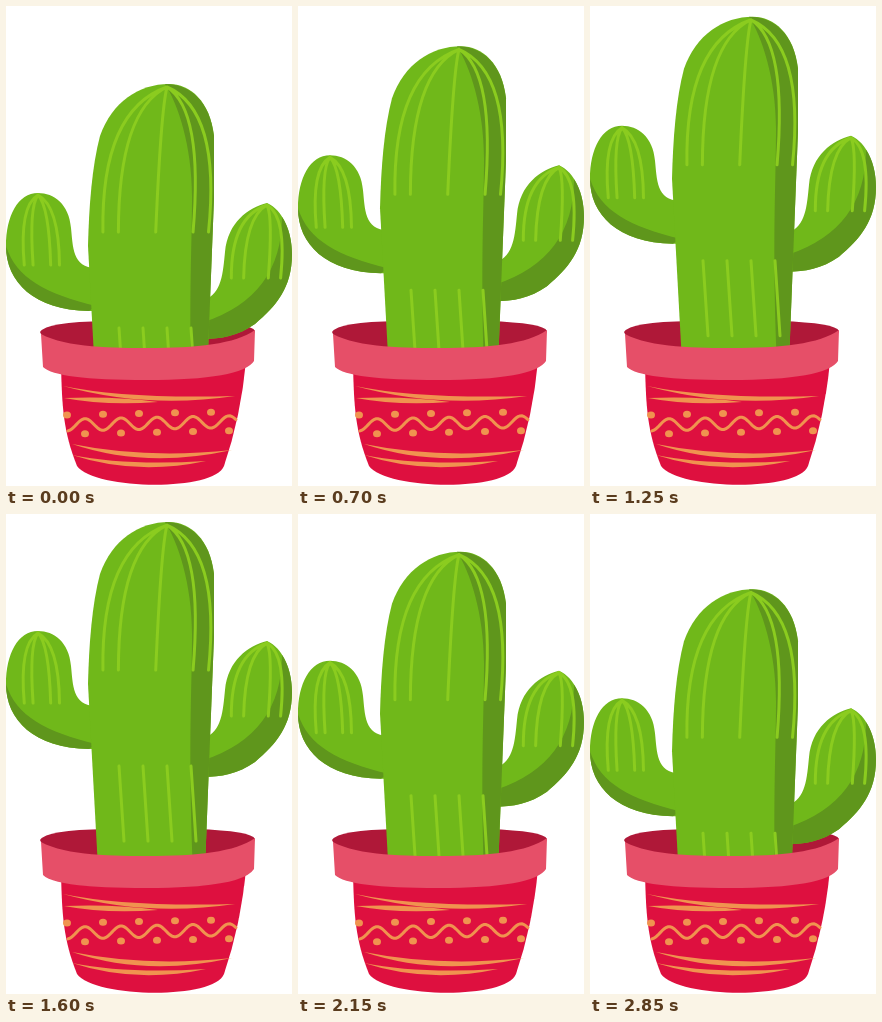
An HTML page for the animation above (2900 ms loop, 286 px wide and 480 px high).

```html
<!DOCTYPE html>
<html lang="en">
<head>
<meta charset="utf-8">
<title>Growing cactus</title>
<style>
  html, body { margin: 0; height: 100%; overflow: hidden; background: #fff; }
  svg { display: block; width: 100vw; height: 100vh; }
  .green { fill: #70b81a; }
  .shade { fill: #5f961c; }
  .line { fill: none; stroke-width: 3; stroke-linecap: round; }
  #ribs { stroke: #8bcc1f; }
  #wave { stroke: #f0934f; }
  .paint { fill: #f0934f; }
</style>
</head>
<body>
<svg viewBox="0 0 286 480">
  <!-- inside of the pot -->
  <path fill="#af1838" d="M34 326Q40 316 100 315H190Q246 317 249 325L240 348H45Z"/>

  <g id="plant">
    <!-- left arm -->
    <path class="green" d="M90 262C66 262 67 240 65 222C63 198 48 187 32 187C12 187 0 210 0 240C0 276 28 304 83 305H90Z"/>
    <path class="shade" d="M0 240C0 276 28 304 83 305L90 300C40 288 10 272 0 240Z"/>
    <!-- right arm -->
    <path class="green" d="M198 294C216 288 217 266 219 246C222 216 242 202 261 197C277 204 286 226 286 248C286 282 270 300 249 318C232 330 214 333 198 333Z"/>
    <path class="shade" d="M276 211C283 221 286 235 286 248C286 282 270 300 249 318C232 330 214 333 198 333V316Q276 290 276 211Z"/>
    <!-- trunk -->
    <path class="green" d="M163 78C133 78 106 96 94 130C86 160 83 200 82 240L92 424H199L208 192V130C204 95 184 78 163 78Z"/>
    <path class="shade" d="M159 78C172 98 186 140 186 190C186 250 182 300 187 424H199L208 192V130C204 95 184 78 159 78Z"/>
    <path class="line" id="ribs"/>
  </g>

  <!-- pot -->
  <path fill="#de103f" d="M55 358C56 400 57 425 71 460C88 484 208 486 218 460Q235 410 240 355Z"/>
  <path fill="#e64f68" d="M35 328C60 342 110 342 142 342C190 342 230 338 249 324L248 355Q236 374 140 374Q50 374 37 361Z"/>
  <!-- brush strokes -->
  <path class="paint" d="M57 380Q120 393 229 390Q140 403 57 380M58 392Q110 390 152 396Q100 400 58 392"/>
  <path class="paint" d="M66 438Q140 453 226 444Q140 463 66 438M66 449Q120 460 200 455Q130 470 66 449"/>
  <g class="paint" id="dots"></g>
  <path class="line" id="wave"/>
</svg>
<script>
  const LOOP = 2900, STEP = 50, RISE = 78;
  const el = id => document.getElementById(id);
  const plant = el("plant");
  const range = n => [...Array(n).keys()];

  // Ribs fan out from a tip, spaced like meridians on a round stem.
  function fan(x, y, n, mid, half, lean, length) {
    return range(n).map(i => {
      const dx = mid - half * Math.cos(Math.PI * i / (n - 1));
      return `M${x} ${y}Q${x + dx} ${y + length * 0.16} ${x - lean + dx * 0.88} ${y + length}`;
    }).join("");
  }
  const lowRibs = range(4).map(i => `M${113 + 24 * i} 322l5 75`).join("");
  el("ribs").setAttribute("d",
    fan(161, 81, 5, -6, 60, 6, 145) + fan(32, 189, 4, 1, 20, -3, 70) +
    fan(261, 199, 4, -8, 28, 4, 73) + lowRibs);

  // Wavy line with a dot under every crest and over every trough.
  const CREST = 79, HALF = 18;
  const middle = x => 419 - (x - 62) * 0.02;
  const waveY = x => middle(x) - 6 * Math.cos(Math.PI * (x - CREST) / HALF);
  el("wave").setAttribute("d", "M" + range(85).map(i => {
    const x = 62 + 2 * i;
    return `${x} ${waveY(x)}`;
  }).join("L"));
  el("dots").innerHTML = range(10).map(i => {
    const x = CREST + HALF * (i - 1);
    return `<ellipse cx="${x}" cy="${middle(x) + (i % 2 ? 9 : -10)}" rx="4" ry="3.5"/>`;
  }).join("");

  // Straight up for half the loop, straight down for the rest.
  function draw(now) {
    const t = Math.floor(now % LOOP / STEP) * STEP;
    const lift = RISE * (1 - Math.abs(1 - 2 * t / LOOP));
    plant.setAttribute("transform", `translate(0 ${-lift})`);
    requestAnimationFrame(draw);
  }
  draw(0);
</script>
</body>
</html>
```
